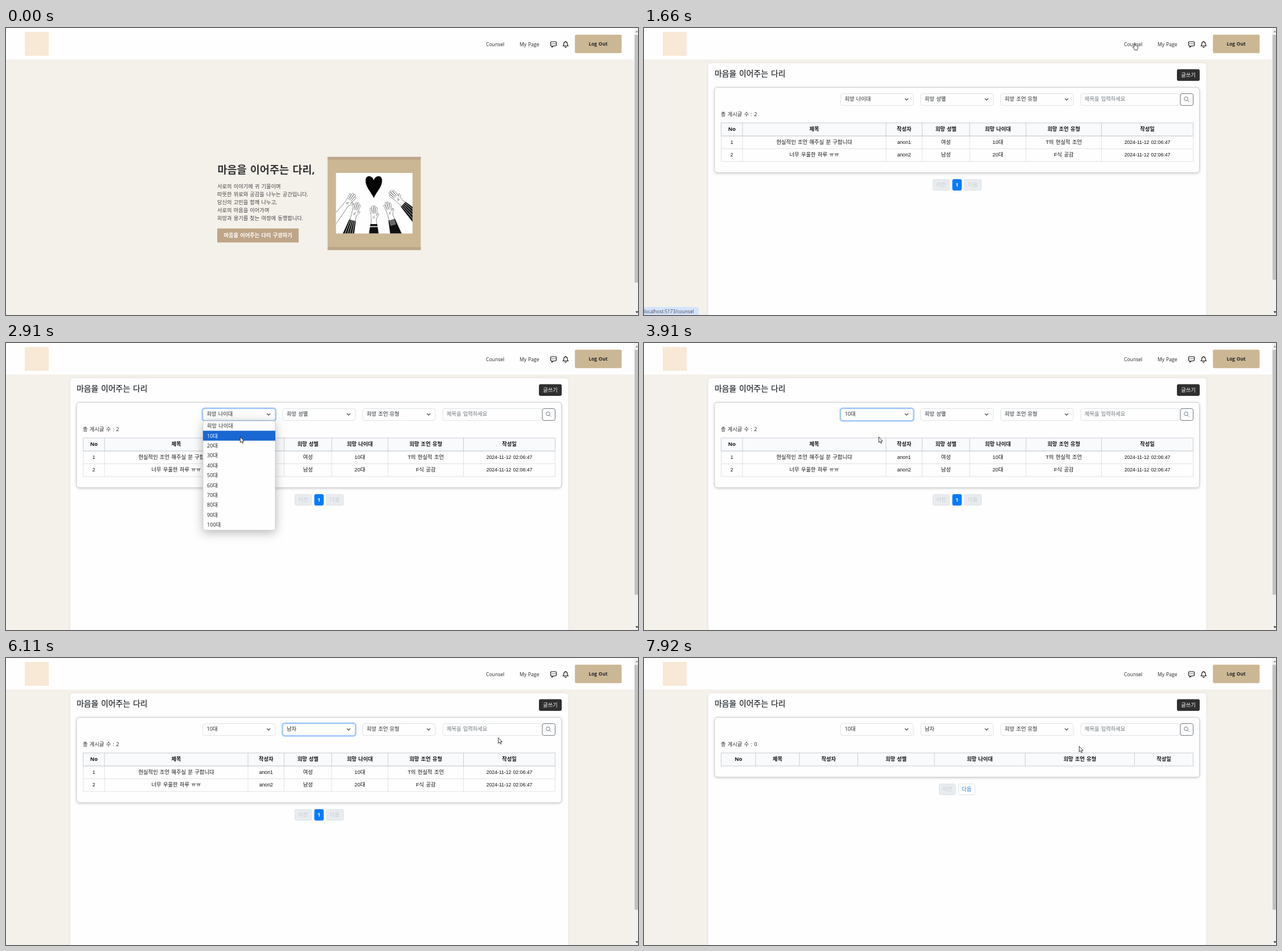
Recreate the animation shown at these times as an HTML page. Size 1110 by 505 pixels, loop 7.99 s.

```html
<!DOCTYPE html>
<html lang="ko">
<head>
<meta charset="utf-8">
<title>마음을 이어주는 다리</title>
<style>
html, body { margin: 0; width: 100%; height: 100%; overflow: hidden; background: #f4f1ea; }
svg { display: block; width: 1110px; height: 505px; }
text { font-family: "Open Sans", "Noto Sans CJK KR", sans-serif; font-size: 9.25px; word-spacing: .08em; fill: #212529; white-space: pre; }
.cell { font-family: "Liberation Sans", "Noto Sans CJK KR", sans-serif; fill: #111; }
.mid { text-anchor: middle; }
.b { font-weight: 700; }
.menu { filter: drop-shadow(0 4px 9px rgba(0,0,0,.28)); }
.card { filter: drop-shadow(0 1px 2px rgba(0,0,0,.2)); }
</style>
</head>
<body>
<svg id="stage" viewBox="0 0 1110 505"></svg>
<script>
const LOOP = 7990;
const PAGE = 1660, OPEN1 = 2690, PICK1 = 3840, OPEN2 = 4770, PICK2 = 5780, CLICK = 6720, RESULT = 6850;
const ROW = 17.4, MENU_Y = 137;

const attrs = o => Object.entries(o).map(([k, v]) => ` ${k}="${v}"`).join('');
const text = (x, y, s, o = {}) => `<text x="${x}" y="${y}"${attrs(o)}>${s}</text>`;
const rect = (x, y, width, height, fill, o = {}) => `<rect${attrs({ x, y, width, height, fill, ...o })}/>`;
const path = (d, o = {}) => `<path${attrs({ d, fill: 'none', ...o })}/>`;
const group = (id, body, o = {}) => `<g${attrs({ id, ...o })}>${body}</g>`;
const mid = (x, y, s, o = {}) => text(x, y, s, { ...o, class: 'mid ' + (o.class || '') });

function header() {
  const line = { stroke: '#111', 'stroke-width': 1.2, 'stroke-linejoin': 'round', 'stroke-linecap': 'round' };
  return rect(0, 0, 1104, 55.3, '#fefefe') +
    rect(33, 7, 42, 42, '#f8e8d6') +
    text(843, 31.5, 'Counsel', { style: 'font-size:8.6px' }) +
    text(902, 31.5, 'My Page', { style: 'font-size:8.6px' }) +
    path('M958 24H965Q966.500 24 966.500 25.500V30Q966.500 31.500 965 31.500H961.500L958.800 33.800V31.500H958Q956.500 31.500 956.500 30V25.500Q956.500 24 958 24Z', line) +
    [959, 961.5, 964].map(x => `<circle cx="${x}" cy="27.8" r=".75" fill="#111"/>`).join('') +
    path('M978.200 31.500Q979.800 30 979.800 27.500Q979.800 24.300 982.800 24.300Q985.800 24.300 985.800 27.500Q985.800 30 987.400 31.500ZM981.500 33.300Q982.800 34.800 984.100 33.300M982.800 23.400V24', line) +
    rect(999.2, 11.8, 82, 32.4, '#cbb794', { rx: 2.5 }) +
    mid(1040, 31.2, 'Log Out', { class: 'b', style: 'font-size:8.3px' });
}

function scrollbar() {
  return rect(1103, 0, 7, 505, '#f1f1f1') + rect(1104, 12, 6, 436, '#c1c1c1', { id: 'thumb' }) +
    path('M1105.500 7.500L1108 4.500L1110 7.500Z', { fill: '#8a8a8a' }) +
    path('M1105.500 498.500H1110.500L1108 501.800Z', { fill: '#333' });
}

// One drawn hand, fingers up, placed by its palm
function hand(x, y, turn, sleeve = '') {
  const fingers = ['M-3.800 -2L-5.400 -11', 'M-1.400 -3L-2 -15', 'M1.400 -3L1.700 -15', 'M3.800 -2L5 -12', 'M3.800 5L7.500 -1'];
  const round = { 'stroke-linecap': 'round' }, ink = { stroke: '#444', 'stroke-width': .6 };
  return `<g transform="translate(${x} ${y}) rotate(${turn})">` +
    path('M-5 -3L-4.500 9L-7 50H7L4.500 9L5 -3Z', { fill: '#fefefe', ...ink }) +
    fingers.map(d => path(d, { stroke: '#444', 'stroke-width': 3.2, ...round }) + path(d, { stroke: '#fefefe', 'stroke-width': 2.2, ...round })).join('') +
    path('M-4.600 -2.500H4.600L4.100 8H-4.100Z', { fill: '#fefefe' }) +
    path('M-2 5L2 1M-1 6L2 4', ink) + sleeve + '</g>';
}

function picture() {
  const cloth = path('M-6 16H6L11 50H-11Z', { fill: '#111' });
  const white = { stroke: '#fefefe', 'stroke-width': .7 };
  const striped = cloth + path('M-4 16L-7 50M-1.300 16L-2.300 50M1.300 16L2.300 50M4 16L7 50', white);
  const ribbed = cloth + path('M-4 16V26M-2 16V26M0 16V26M2 16V26M4 16V26', white);
  const banded = cloth + path('M-7 20.500H7', { ...white, 'stroke-width': 1.5 });
  return rect(564.8, 226.8, 163.6, 163.8, '#cbb794') + rect(564.8, 226.8, 163.6, 5, '#bda589') + rect(564.8, 385.4, 163.6, 5.2, '#bda589') +
    rect(579.6, 255, 134.4, 106.6, '#fefefe') +
    '<clipPath id="photo"><rect x="579.6" y="255" width="134.4" height="106.6"/></clipPath><g clip-path="url(#photo)">' +
    path('M646 268C643 259 632 258 631.500 268C631 279 640 287 646 299C651 288 661 279 660.500 268C660 258 649 259 646 268Z', { fill: '#050505' }) +
    hand(602, 305, 38) + hand(686, 299, -46, striped) +
    hand(613, 323, 16, striped) + hand(673, 322, -16, ribbed) + hand(646, 329, 0, banded) + '</g>';
}

function home() {
  const lines = ['서로의 이야기에 귀 기울이며', '따뜻한 위로와 공감을 나누는 공간입니다.', '당신의 고민을 함께 나누고,', '서로의 마음을 이어가며', '희망과 용기를 찾는 여정에 동행합니다.'];
  return text(371.5, 256.3, '마음을 이어주는 다리,', { class: 'b', style: 'font-size:18.5px;fill:#333' }) +
    lines.map((s, i) => text(371, 282 + i * 14, s, { style: 'fill:#444' })).join('') +
    rect(371, 352.7, 143, 24.7, '#bfa588') +
    mid(442.5, 368, '마음을 이어주는 다리 구경하기', { class: 'b', style: 'fill:#fff' }) + picture();
}

function select(x, label, n) {
  return rect(x - 1, 114.5, 129.5, 23, '#fefefe', { id: 'ring' + n, rx: 4.5, stroke: '#b5d2fd', 'stroke-width': 2.4 }) +
    rect(x, 115.5, 127.5, 20.8, '#fefefe', { id: 'box' + n, rx: 3.5, stroke: '#dee2e6' }) +
    text(x + 7, 128.4, label, { id: 'label' + n }) +
    path(`M${x + 113} 124.300l2.700 2.700l2.700 -2.700`, { stroke: '#343a40', 'stroke-width': 1.2, 'stroke-linecap': 'round' });
}

function table(cols, rows) {
  const edges = [135.5, ...cols, 964.5];
  const center = i => (edges[i] + edges[i + 1]) / 2;
  const heads = ['No', '제목', '작성자', '희망 성별', '희망 나이대', '희망 조언 유형', '작성일'];
  const box = (y, h, c) => path(edges.map(x => `M${x} ${y}v${h}`).join('') + `M135.500 ${y}H964.500M135.500 ${y + h}H964.500`, { stroke: c });
  return rect(135.5, 167, 829, 23, '#f8fafc') +
    rows.map((r, i) => box(190 + i * 22.5, 22.5, '#dee2e6') +
      r.map((s, c) => mid(center(c), 203.5 + i * 22.5, s, { class: 'cell', style: `font-size:${/[가-힣]/.test(s) ? 9.3 : 8.7}px` })).join('')).join('') +
    box(167, 23, '#c9cdd1') +
    heads.map((s, c) => mid(center(c), 181.3, s, { class: 'b', style: 'fill:#111' })).join('');
}

const card = h => rect(124, 104.5, 851.5, h, '#fefefe', { rx: 5, stroke: '#cfcfcf', class: 'card' });

function pager(x, y, w, s, kind) {
  const [fill, stroke, ink] = { off: ['#e9ecef', '#dee2e6', '#c6cacf'], on: ['#007bff', '#007bff', '#fff'], link: ['#fefefe', '#dee2e6', '#2f74d0'] }[kind];
  return rect(x + .5, y + .5, w - 1, 19, fill, { rx: 2, stroke }) +
    mid(x + w / 2, y + 13.2, s, { class: kind === 'on' ? 'b' : '', style: 'fill:' + ink });
}

function board() {
  const full = [
    ['1', '현실적인 조언 해주실 분 구합니댜', 'anon1', '여성', '10대', 'T의 현실적 조언', '2024-11-12 02:06:47'],
    ['2', '너무 우울한 하루 ㅠㅠ', 'anon2', '남성', '20대', 'F식 공감', '2024-11-12 02:06:47']];
  return rect(113, 62, 874.5, 460, '#fefefe', { rx: 5, style: 'filter:drop-shadow(0 0 2px rgba(0,0,0,.07))' }) +
    text(124, 85, '마음을 이어주는 다리', { style: 'font-size:13.9px;font-weight:500;stroke:#212529;stroke-width:.25px' }) +
    rect(936, 72.5, 40, 20.5, '#2f2f2f', { rx: 3 }) + mid(956, 86, '글쓰기', { style: 'fill:#fff' }) +
    group('full', card(150) + table([173, 425, 488.5, 572, 671, 803.5], full) +
      pager(507, 266, 30, '이전', 'off') + pager(541.5, 266, 16.5, '1', 'on') + pager(562, 266, 31, '다음', 'off')) +
    group('none', card(105) + table([196, 273, 375.5, 510, 669.5, 861.5], []) +
      pager(518, 221, 29.5, '이전', 'off') + pager(552, 221, 29.5, '다음', 'link')) +
    select(345.5, '희망 나이대', 1) + select(486, '희망 성별', 2) + select(626.5, '희망 조언 유형', 3) +
    rect(767, 115.5, 175, 20.8, '#fefefe', { rx: 3.5, stroke: '#dee2e6' }) +
    text(774, 128.4, '제목을 입력하세요', { style: 'fill:#6c757d' }) +
    rect(942, 115.5, 22.5, 20.8, '#fefefe', { id: 'search', rx: 3, stroke: '#6c757d' }) +
    group('lens', '<circle cx="952" cy="124.500" r="3.300"/>' + path('M954.500 127L957.300 129.800'), { fill: 'none', stroke: '#6c757d', 'stroke-width': 1 }) +
    text(135, 154.5, '총 게시글 수 : 2', { id: 'count', style: 'word-spacing:.1em' });
}

function menu(id, x, items) {
  return group(id, rect(x, MENU_Y, 127, items.length * ROW + 1, '#fefefe', { rx: 3, stroke: '#b8b8b8', 'stroke-width': .6 }) +
    rect(x, MENU_Y, 127, ROW, '#1967d2', { class: 'pick' }) +
    items.map((s, i) => text(x + 7, MENU_Y + 12.2 + i * ROW, s)).join(''), { class: 'menu' });
}

const ages = ['희망 나이대', ...Array.from({ length: 10 }, (_, i) => `${i + 1}0대`)];
const outline = { fill: '#fff', stroke: '#222', 'stroke-width': .9, 'stroke-linejoin': 'round' };
const stage = document.getElementById('stage');
stage.innerHTML = rect(0, 0, 1110, 505, '#f4f1ea') + group('home', home()) + group('board', board()) + header() + scrollbar() +
  menu('menu1', 346, ages) + menu('menu2', 486.5, ['희망 성별', '남자', '여자']) +
  group('status', path('M0 491H93Q96 491 96 494V505H0Z', { fill: '#d3e3fd' }) + text(0, 502.4, 'localhost:5173/counsel', { style: 'font-size:8.2px;fill:#444' })) +
  group('cursor', path('M.400 .400V10.200L2.600 8.200L4.100 11.600L5.700 10.900L4.200 7.600H7.200Z', { id: 'arrow', ...outline }) +
    path('M2.800 7V1.300Q2.800 .300 3.700 .300Q4.600 .300 4.600 1.300V4.800Q6 4.200 6.400 5.200Q7.700 4.700 8 5.700Q9.400 5.400 9.400 6.800V9.200Q9.400 10.700 8.400 11.700V12.800H3.800V11.900L.700 8.400Q.200 7.300 1.300 7Q2.100 7 2.800 8.200Z', { id: 'point', ...outline }));

const $ = id => document.getElementById(id);
const show = (id, on) => { $(id).style.opacity = +on; };
const between = (t, a, b) => t >= a && t < b;
const ramp = (t, a, d) => Math.max(0, Math.min(1, (t - a) / d));
const fade = (t, a, b, d = 150) => ramp(t, a, d) - ramp(t, b, d);

// Pointer stops: time, x, y
const stops = [[110, 1029, 490], [500, 957, 190], [890, 893, 42], [1020, 891, 32], [1170, 891, 32], [1310, 872, 20], [1480, 858, 26], [1690, 858, 26],
  [1890, 529, 113], [2200, 472, 118], [2430, 457, 121], [2710, 457, 121], [2910, 411, 165], [3570, 411, 165], [3700, 412, 165], [3920, 412, 165],
  [4510, 591, 121], [4840, 591, 121], [5110, 551, 151], [5250, 545, 161], [5800, 545, 161], [6110, 864, 140], [6420, 948, 121], [7420, 950, 122],
  [7650, 752, 182], [7920, 764, 155]];

function pointer(t) {
  const i = stops.findIndex(s => s[0] > t);
  if (i < 0) return stops[stops.length - 1].slice(1);
  if (!i) return stops[0].slice(1);
  const [a, ax, ay] = stops[i - 1], [b, bx, by] = stops[i], k = (t - a) / (b - a);
  return [ax + (bx - ax) * k, ay + (by - ay) * k];
}

function label(id, s) {
  if ($(id).textContent !== s) $(id).textContent = s;
}

function draw(t) {
  const [x, y] = pointer(t);
  const onLink = between(t, 1440, 1700), onSearch = between(t, 6410, 7440);
  show('cursor', t >= 110);
  $('cursor').setAttribute('transform', `translate(${x.toFixed(2)} ${y.toFixed(2)})`);
  show('arrow', !(onLink || onSearch));
  show('point', onLink || onSearch);

  show('home', t < PAGE);
  show('board', t >= PAGE);
  $('thumb').setAttribute('height', t < PAGE ? 436 : 431);
  $('status').style.opacity = fade(t, 1440, 2000, 60);

  show('full', t < RESULT);
  show('none', t >= RESULT);
  label('count', '총 게시글 수 : ' + (t < RESULT ? 2 : 0));
  label('label1', t < PICK1 ? '희망 나이대' : '10대');
  label('label2', t < PICK2 ? '희망 성별' : '남자');

  const rings = [fade(t, OPEN1, OPEN2), fade(t, OPEN2, CLICK), 0];
  rings.forEach((v, i) => {
    $('ring' + (i + 1)).style.opacity = v;
    $('box' + (i + 1)).setAttribute('stroke', v > .5 ? '#86b7fe' : '#dee2e6');
  });

  [['menu1', between(t, OPEN1, PICK1), 10], ['menu2', between(t, OPEN2, PICK2), 2]].forEach(([id, open, last]) => {
    show(id, open);
    const row = Math.max(0, Math.min(last, Math.floor((y - MENU_Y) / ROW)));
    $(id).querySelector('.pick').setAttribute('y', MENU_Y + row * ROW);
    $(id).querySelectorAll('text').forEach((e, i) => { e.style.fill = i === row ? '#fff' : '#212529'; });
  });

  const hover = fade(t, 6410, 7440);
  const blend = (a, b) => `rgb(${a.map((v, i) => Math.round(v + (b[i] - v) * hover))})`;
  const white = [254, 254, 254], gray = [108, 117, 125];
  $('search').setAttribute('fill', blend(white, gray));
  $('lens').setAttribute('stroke', blend(gray, white));
}

const start = performance.now();
function tick() {
  draw((performance.now() - start) % LOOP);
  requestAnimationFrame(tick);
}
draw(0);
requestAnimationFrame(tick);
</script>
</body>
</html>
```
